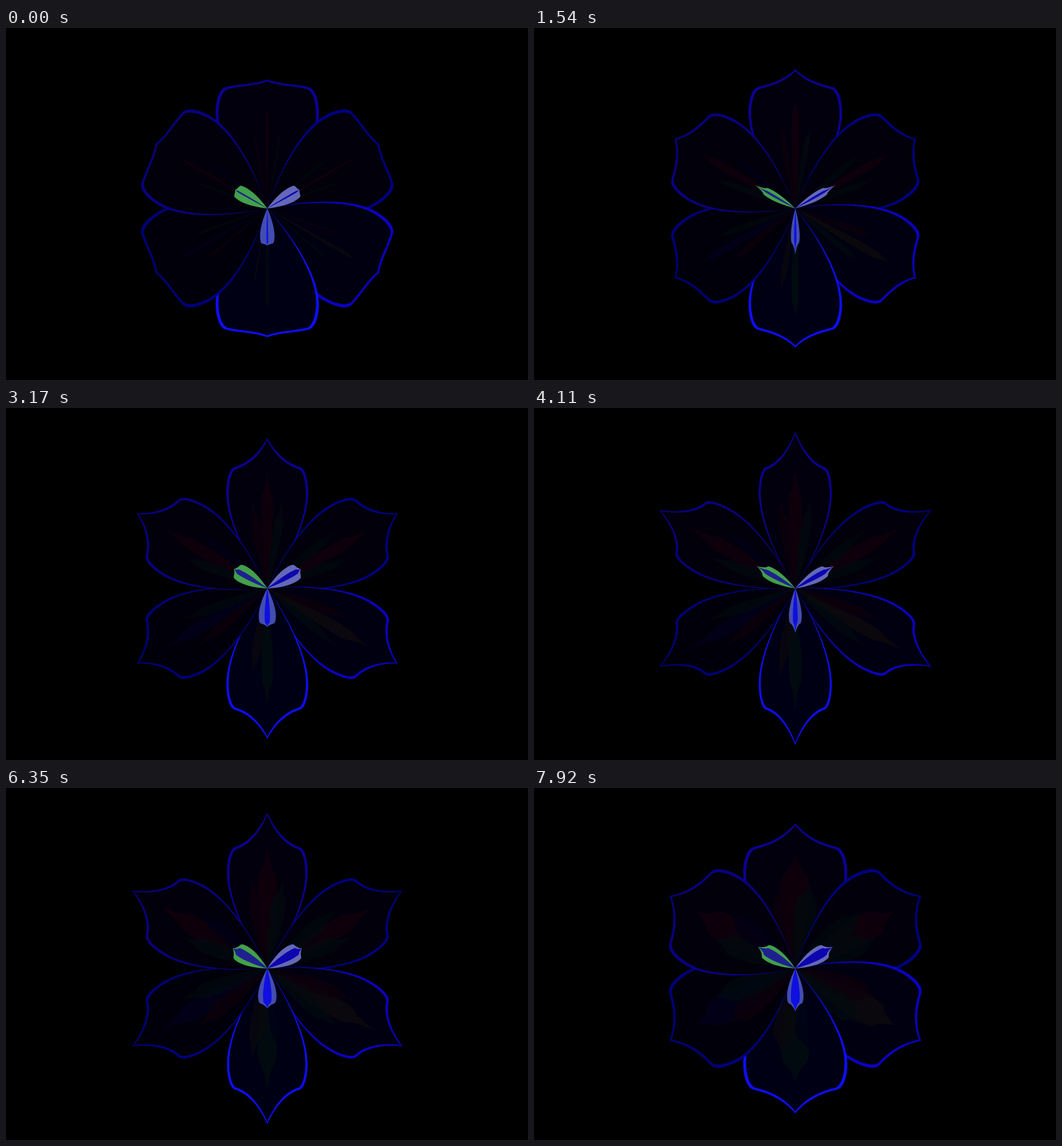
Write an HTML page with a canvas that moves like this. It is 829 px wide and 560 px high and loops after 7990 ms.

```html
<!DOCTYPE html>
<html lang="en">
<head>
<meta charset="utf-8">
<title>Flower</title>
<style>
html, body { margin: 0; width: 100%; height: 100%; overflow: hidden; background: #000; }
canvas { display: block; }
</style>
</head>
<body>
<canvas id="stage" width="829" height="560"></canvas>
<script>
const ctx = document.getElementById('stage').getContext('2d');
const LOOP = 7990;
const RED = '#0e000b', GREEN = '#010a0e', OLIVE = '#0a080c', BLUE = '#010016';

// Clockwise from the top; streaks are [centre, left, right] looking outwards.
const PETALS = [
  { edge: '#0d0093', fill: '#02000c', streaks: [RED, RED, GREEN] },
  { edge: '#010083', fill: '#01000b', streaks: [RED, GREEN, GREEN] },
  { edge: '#0c00c2', fill: '#010010', streaks: [OLIVE, RED, GREEN] },
  { edge: '#0e0ef0', fill: '#000014', streaks: [GREEN, BLUE, OLIVE] },
  { edge: '#01007b', fill: '#01000a', streaks: [BLUE, RED, GREEN] },
  { edge: '#0a007f', fill: '#02000b', streaks: [RED, GREEN, BLUE] }
];
const CORE = [
  { angle: 60, fill: '#6468b8', vein: '#0d05ae' },
  { angle: 180, fill: '#434db0', vein: '#0f0fdf' },
  { angle: 300, fill: '#43a04b', vein: '#1f2090' }
];

// time, petal half-width, streak half-width
const WIDTHS = [
  [0, 82, 2.2], [1540, 74.3, 6], [3170, 65, 9], [4110, 58, 10.3],
  [5020, 51, 11], [5150, 50, 11.4], [6350, 64, 15], [7990, 83.5, 22.4]
];

const rad = deg => deg * Math.PI / 180;

// Triangle wave, 0 to 1 in the given half period and back.
function swing(t, half) {
  const p = (t / half) % 2;
  return p < 1 ? p : 2 - p;
}

function widthAt(t, column) {
  const i = Math.max(1, WIDTHS.findIndex(row => row[0] >= t));
  const a = WIDTHS[i - 1], b = WIDTHS[i];
  return a[column] + (b[column] - a[column]) * (t - a[0]) / (b[0] - a[0]);
}

// Petal pointing up: half-width w, tip at height `tip`, shoulders at 193, all times scale.
function petal(angle, w, tip, color, scale = 1, squeeze = 1) {
  ctx.save();
  ctx.translate(415, 287);
  ctx.rotate(rad(angle));
  ctx.scale(w * squeeze, -scale);
  ctx.beginPath();
  for (const s of [-1, 1]) {
    ctx.moveTo(0, 0);
    ctx.bezierCurveTo(0.45 * s, 40, s, 105, s, 152);
    ctx.bezierCurveTo(s, 172, 0.93 * s, 190.4, 0.8 * s, 193);
    ctx.bezierCurveTo(0.55 * s, 198, 0.25 * s, 193 + (tip - 193) * 0.36, 0, tip);
    ctx.lineTo(0, 0);
  }
  ctx.restore();
  ctx.fillStyle = color;
  ctx.fill();
}

function drawPetals(t) {
  const tip = 205 + 55.5 * swing(t, 5150);
  const w = widthAt(t, 1), streak = widthAt(t, 2);
  PETALS.forEach(({ edge, fill, streaks }, i) => {
    const angle = i * 60;
    petal(angle, w, tip, edge);
    petal(angle, w, tip, fill, 0.985, 0.945);
    petal(angle, streak, tip, streaks[0], 0.785);
    ctx.globalAlpha = 0.7;
    petal(angle - 10, streak * 0.78, tip, streaks[1], 0.59);
    petal(angle + 10, streak * 0.78, tip, streaks[2], 0.59);
    ctx.globalAlpha = 1;
  });
}

function drawCore(t) {
  const s = t / 1000, phase = swing(t, 1475), scale = 0.287;
  const tip = (59 + 15 * phase) / scale;
  const w = 11.5 + 1.15 * s - 0.055 * s * s - 6.5 * phase;
  const vein = (1.3 + s) * (1 - 0.37 * phase);
  for (const c of CORE) {
    petal(c.angle, w, tip, c.fill, scale);
    petal(c.angle, vein, tip, c.vein, scale * 0.99);
  }
}

function draw(t) {
  ctx.fillStyle = '#000';
  ctx.fillRect(0, 0, 829, 560);
  drawPetals(t);
  drawCore(t);
}

let start;
function tick(now) {
  start ??= now;
  draw(Math.max(0, now - start) % LOOP);
  requestAnimationFrame(tick);
}
draw(0);
requestAnimationFrame(tick);
</script>
</body>
</html>
```
